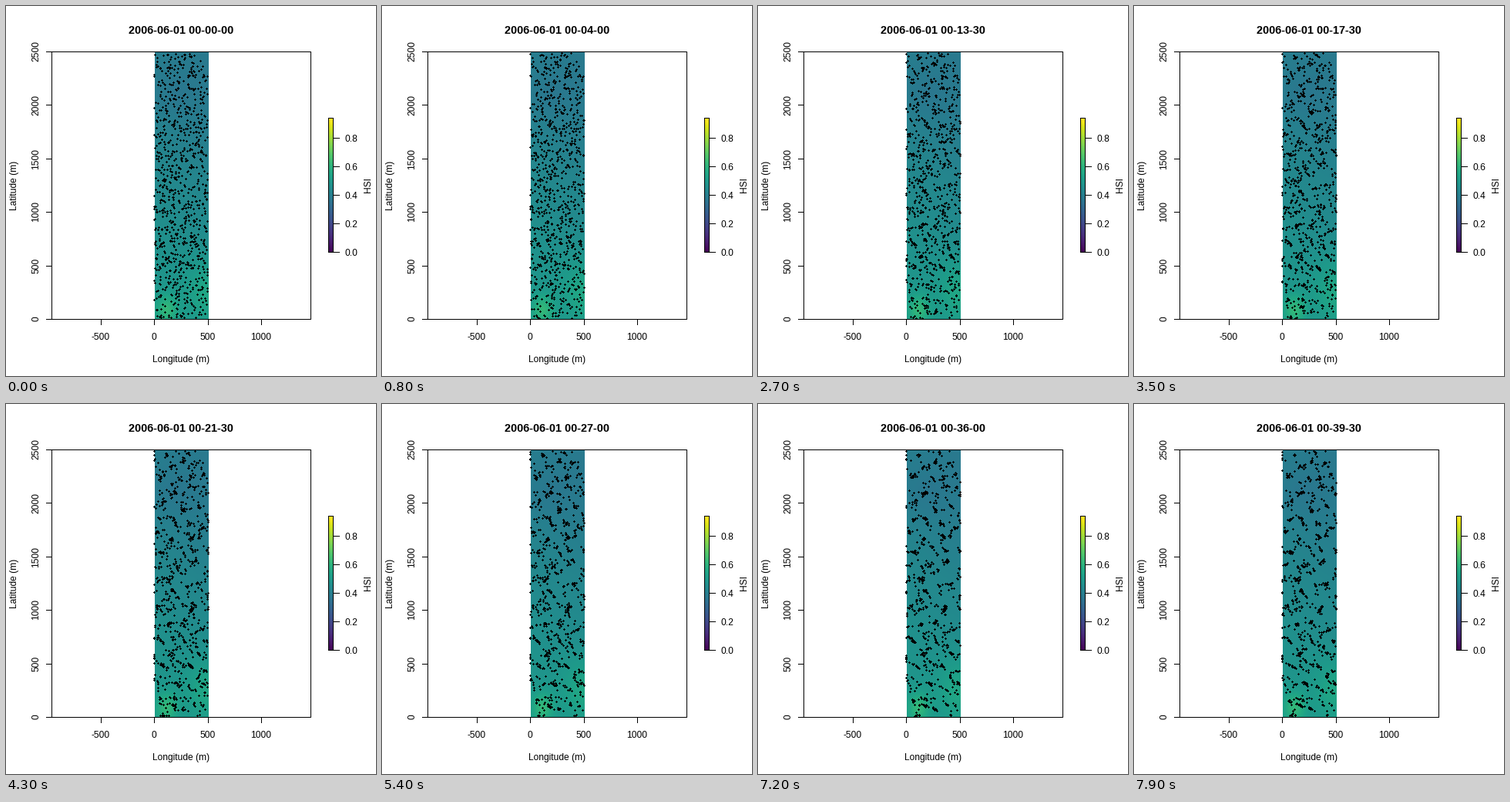
These frames come from a looping animation (480 px wide and 480 px high, 8000 ms). A matplotlib script:

```python
import numpy as np
import matplotlib.pyplot as plt
from matplotlib.animation import FuncAnimation

plt.rcParams["font.family"] = "Liberation Sans"

SIZE, DPI = 480, 100
FRAMES, INTERVAL = 80, 100
PX = 72 / DPI
LEFT, RIGHT, TOP, BOTTOM = 193, 263, 60, 406    # raster strip
PAD = 4                                         # room for dots at the edges
X0, Y0, X1, Y1 = LEFT - PAD, TOP - PAD, RIGHT + PAD, BOTTOM + PAD
COUNT = 930
viridis = plt.get_cmap("viridis")


def to_x(m):
    return np.floor(192.6 + m * 0.1388)


def to_y(m):
    return np.floor(406.4 - m * 0.1388)


def bump(u, v, cu, cv, su, sv):
    return np.exp(-((u - cu) / su) ** 2 - ((v - cv) / sv) ** 2)


def suitability():
    """Habitat index over the strip, scaled to the colour map."""
    u, v = np.meshgrid((np.arange(LEFT, RIGHT) + 0.5 - LEFT) / (RIGHT - LEFT),
                       (BOTTOM - np.arange(TOP, BOTTOM) - 0.5) / (BOTTOM - TOP))
    n = 0.465 + 0.052 * np.cos(np.pi * v) + 0.02 * (0.5 - u)
    n += 0.14 * bump(u, v, 0.22, 0.035, 0.2, 0.055)
    n += 0.09 * bump(u, v, 1.0, 0.1, 0.42, 0.12)
    n -= 0.025 * bump(u, v, 0.35, 0.84, 0.4, 0.08)
    return n


def walk():
    """Noisy climb on a smooth random field; positions at every step."""
    rng = np.random.default_rng(2006)
    low, high = (192, 61), (262, 405)
    angle = rng.uniform(0, 2 * np.pi, 40)
    freq = 2 * np.pi / rng.uniform(9, 32, 40)
    phase = rng.uniform(0, 2 * np.pi, 40)
    waves = np.column_stack([np.cos(angle), np.sin(angle)]) * freq[:, None]
    heading = np.column_stack([np.cos(angle), np.sin(angle)])
    spots = np.array([(211, 388), (258, 358)])  # best habitat

    p = rng.uniform(low, high, (COUNT, 2))
    steps = [p]
    for _ in range(FRAMES - 1):
        drift = 0.021 * np.cos(p @ waves.T + phase) @ heading
        for spot in spots:
            off = spot - p
            near = np.exp(-(off ** 2).sum(1, keepdims=True) / 200)
            drift += 0.02 * off * near
        p = np.clip(p + drift + rng.normal(0, 0.25, p.shape), low, high)
        steps.append(p)
    return steps


track = walk()
base = np.ones((Y1 - Y0, X1 - X0, 3))
base[PAD:-PAD, PAD:-PAD] = viridis(suitability())[..., :3]

fig = plt.figure(figsize=(SIZE / DPI, SIZE / DPI), dpi=DPI, facecolor="white")
ax = fig.add_axes([0, 0, 1, 1])
ax.axis("off")


def line(xs, ys):
    ax.plot(xs, ys, color="black", lw=PX, antialiased=False, zorder=3)


def box(x0, y0, x1, y1):
    line([x0, x1, x1, x0, x0], [y0, y0, y1, y1, y0])


def label(x, y, s, size=12, **kw):
    kw.setdefault("ha", "center")
    return ax.text(x, y, s, fontsize=size * PX, va="baseline",
                   rotation_mode="anchor", zorder=4, **kw)


strip = ax.imshow(base, extent=(X0, X1, Y1, Y0), interpolation="nearest",
                  aspect="auto", zorder=1)
ax.imshow(viridis(np.linspace(1, 0, 174))[:, None, :3],
          extent=(418, 425, 320, 146), interpolation="nearest",
          aspect="auto", zorder=1)
ax.set_xlim(0, SIZE)
ax.set_ylim(SIZE, 0)

box(59, 59, 395, 406)
for m in (-500, 0, 500, 1000):
    x = to_x(m)
    line([x, x], [406, 413])
    label(x - 0.5, 433, f"{m}")
for m in range(0, 2501, 500):
    y = to_y(m)
    line([52, 59], [y, y])
    label(42.5, y, f"{m}", rotation=90)

box(418, 145, 424, 319)
for i in range(5):
    y = np.floor(319.5 - 36.9 * i)
    line([424, 432], [y, y])
    label(439, y + 5, f"{i * 0.2:.1f}", ha="left")

label(227, 462, "Longitude (m)")
label(14, 232.5, "Latitude (m)", rotation=90)
label(473, 232.5, "HSI", rotation=90)
title = label(227, 36, "", 14.4, weight="bold")


def draw(k):
    img = base.copy()
    col, row = np.floor(track[k] - (X0, Y0)).astype(int).T
    for dx, dy in ((0, 0), (1, 0), (-1, 0), (0, 1), (0, -1)):
        img[row + dy, col + dx] = 0
    strip.set_data(img)
    minute, second = divmod(k * 30, 60)
    title.set_text(f"2006-06-01 00-{minute:02d}-{second:02d}")
    return strip, title


anim = FuncAnimation(fig, draw, frames=FRAMES, interval=INTERVAL,
                     repeat=True, repeat_delay=0)
plt.show()
```
